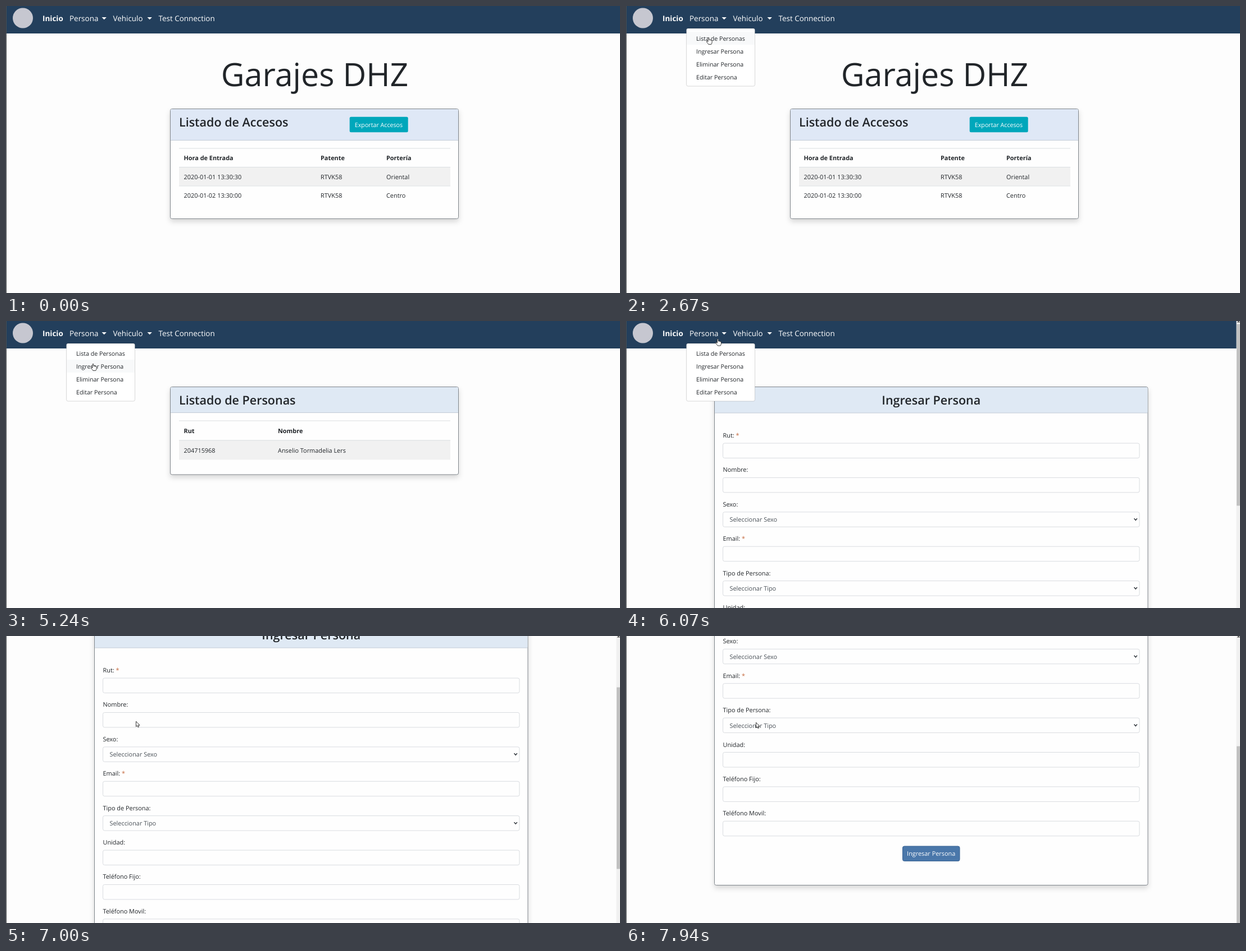
An HTML page for the animation above (8 s loop, 1093 by 512 pixels).

```html
<!DOCTYPE html>
<html lang="es">
<head>
<meta charset="utf-8">
<title>Accesos</title>
<style>
  html, body { margin: 0; width: 100%; height: 100%; overflow: hidden; background: #fdfdfd; }
  svg { display: block; width: 100vw; height: 100vh; }
  text { font-family: "Open Sans", "Noto Sans", sans-serif; text-rendering: geometricPrecision; }
  .card { fill: #fefefe; stroke: #80868c; filter: drop-shadow(0 5.8px 5px rgba(0, 0, 0, .15)); }
  .field { fill: #fefefe; stroke: #d9dce0; }
</style>
</head>
<body>
<svg id="stage" viewBox="0 0 1093 512"></svg>
<script>
const LOOP = 8000;
const LIST_LOAD = 3520, FORM_LOAD = 5750;
const INK = '#212529';
const NAV_HEIGHT = 49, MENU_TOP = 46, ITEM_HEIGHT = 23;
const menuItems = ['Lista de Personas', 'Ingresar Persona', 'Eliminar Persona', 'Editar Persona'];

const text = (x, y, content, { size = 10.9, weight = 400, fill = INK, anchor = 'start' } = {}) =>
  `<text x="${x}" y="${y}" font-size="${size}" font-weight="${weight}" fill="${fill}" text-anchor="${anchor}">${content}</text>`;
const rect = (x, y, w, h, fill, extra = '') =>
  `<rect x="${x}" y="${y}" width="${w}" height="${h}" fill="${fill}" ${extra}/>`;

function card({ x, y, w, h, header, tint = '#dfe9f4', title, centered }) {
  const style = { size: 21.5, weight: 600, anchor: centered ? 'middle' : 'start' };
  return `<rect class="card" x="${x}" y="${y}" width="${w}" height="${h}" rx="3"/>` +
    rect(x + .5, y + .5, w - 1, header, tint, 'rx="2.5"') +
    rect(x + .5, y + header, w - 1, 1, '#c3ccd7') +
    text(centered ? x + w / 2 : x + 15.5, y + 31.8, title, style);
}

function table(top, rowHeight, columns, rows) {
  return rows.map((cells, i) => {
    const y = top + i * rowHeight;
    const weight = i ? 400 : 700;
    return (i % 2 ? rect(308, y, 483, rowHeight, '#f1f1f1') : '') +
      rect(308, y, 483, 1, '#dbdfe2') +
      cells.map((cell, c) => text(columns[c], y + rowHeight / 2 + 5.1, cell, { weight })).join('');
  }).join('');
}

function homePage() {
  return text(549.5, 143, 'Garajes DHZ', { size: 57.3, anchor: 'middle' }) +
    card({ x: 292.5, y: 183.5, w: 513, h: 196, header: 55.5, tint: '#dfe8f6', title: 'Listado de Accesos' }) +
    rect(611.7, 197.7, 104, 27.6, '#00a7bb', 'rx="2.5"') +
    text(663.5, 216, 'Exportar Accesos', { size: 10.7, fill: '#fff', anchor: 'middle' }) +
    table(253.5, 33.5, [316.5, 560, 677], [
      ['Hora de Entrada', 'Patente', 'Portería'],
      ['2020-01-01 13:30:30', 'RTVK58', 'Oriental'],
      ['2020-01-02 13:30:00', 'RTVK58', 'Centro']
    ]);
}

function listPage() {
  return card({ x: 292.5, y: 117.5, w: 513, h: 156.5, header: 45.5, title: 'Listado de Personas' }) +
    table(177.5, 35, [316.5, 484], [['Rut', 'Nombre'], ['204715968', 'Anselio Tormadelia Lers']]);
}

function formPage() {
  const fields = [
    { label: 'Rut:', required: true }, { label: 'Nombre:' },
    { label: 'Sexo:', option: 'Seleccionar Sexo' }, { label: 'Email:', required: true },
    { label: 'Tipo de Persona:', option: 'Seleccionar Tipo' },
    { label: 'Unidad:' }, { label: 'Teléfono Fijo:' }, { label: 'Teléfono Movil:' }
  ];
  const rows = fields.map(({ label, required, option }, i) => {
    const y = 218 + i * 61.4;
    const star = required ? ' <tspan fill="#c4683c">*</tspan>' : '';
    return text(172.5, y - 10, label + star) +
      `<rect class="field" x="172.5" y="${y}" width="741.5" height="26.5" rx="3"/>` +
      (option ? text(184.5, y + 17.5, option, { fill: '#495057' }) +
        `<path d="M904.5 ${y + 11.5}l2.7 3 2.7-3" fill="none" stroke="#343a40" stroke-width="1.5"/>` : '');
  });
  return card({ x: 157.5, y: 117.5, w: 771.5, h: 644.5, header: 46, title: 'Ingresar Persona', centered: true }) +
    rows.join('') +
    rect(492.5, 692.5, 101.5, 26.5, '#4a77aa', 'rx="3" stroke="#386394"') +
    text(543.2, 709.8, 'Ingresar Persona', { fill: '#fff', anchor: 'middle' });
}

function navbar() {
  const link = { size: 13.45, fill: '#fff' };
  const caret = x => `<path d="M${x} 20h8.4l-4.2 4.3z" fill="#fff"/>`;
  return rect(0, 0, 1093, NAV_HEIGHT, '#233f5c') +
    '<circle id="logo" cx="30" cy="21.5" r="18" fill="#c6c7d0"/>' +
    text(65, 27, 'Inicio', { ...link, weight: 700 }) +
    text(113, 27, 'Persona', link) + caret(170.5) +
    text(190.5, 27, 'Vehiculo', link) + caret(251.5) +
    text(271.5, 27, 'Test Connection', link);
}

function dropdown() {
  return rect(107.5, 40, 122, 103, '#fff', 'rx="3" stroke="#000" stroke-opacity=".15"') +
    `<rect id="highlight" x="108" width="121" height="${ITEM_HEIGHT}"/>` +
    menuItems.map((item, i) =>
      `<g class="item">${text(125, 61.8 + i * ITEM_HEIGHT, item, { size: 10.65, fill: 'inherit' })}</g>`).join('');
}

const stage = document.getElementById('stage');
stage.innerHTML = rect(0, 0, 1093, 512, '#fdfdfd') +
  `<g id="page">
    <g id="home">${homePage()}</g><g id="list">${listPage()}</g><g id="form">${formPage()}</g>
    ${navbar()}<g id="menu">${dropdown()}</g>
  </g>
  <g id="scrollbar">${rect(1086.5, 0, 6.5, 512, '#f1f1f1')}
    <path d="M1087.5 2.5l3-3 3 3z" fill="#505050"/>
    <rect id="thumb" x="1087" width="6" height="324" fill="#c1c1c1"/>
  </g>
  ${rect(0, 0, 1, 512, '#4a4d50')}
  <g id="cursor" stroke="#222" stroke-width=".9" stroke-linejoin="round" fill="#fff">
    <path id="arrow" d="M.5 .3v9.4l2.1-1.9 1.5 3 1.5-.7-1.4-2.9h2.9z"/>
    <path id="hand" d="M-1 7.6V1.2Q0-.7 1 1.2V4.4Q2.2 3.6 3 4.8 4.2 4 4.9 5.3 6 5 6.1 6.3V8.7Q5.8 11 4.8 12.4H-.2Q-1.2 10.8-3.2 8.4-4.4 6.7-2.8 6.6-1.9 6.8-1 7.6z"/>
  </g>`;
const el = Object.fromEntries([...stage.querySelectorAll('[id]')].map(node => [node.id, node]));
const itemNodes = stage.querySelectorAll('.item');

// The pointer rests between these moves.
const entry = { x: 978, y: 436 };
const moves = [
  { from: 610, to: 1400, x: 126, y: 66 },
  { from: 1480, to: 1870, x: 126, y: 23 },
  { from: 2030, to: 2350, x: 147, y: 56 },
  { from: 4210, to: 4530, x: 151, y: 14 },
  { from: 4680, to: 4920, x: 153, y: 97 },
  { from: 5090, to: 5240, x: 155, y: 76 },
  { from: 5910, to: 6140, x: 165, y: 23 },
  { from: 6300, to: 6460, x: 231, y: 152 },
  { from: 7790, to: 7940, x: 231, y: 154 }
];

const during = (t, ...spans) => spans.some(([from, to]) => t >= from && t < to);
const show = (node, visible) => node.setAttribute('display', visible ? 'inline' : 'none');
const easeOut = (t, from, to, power) =>
  1 - (1 - Math.min(1, Math.max(0, (t - from) / (to - from)))) ** power;

function pointerAt(t) {
  return moves.reduce((p, { from, to, x, y }) => {
    const k = easeOut(t, from, to, 1.5);
    return { x: p.x + (x - p.x) * k, y: p.y + (y - p.y) * k };
  }, entry);
}

function render(t) {
  const { x, y } = pointerAt(t);
  const scroll = 317.5 * easeOut(t, 6732, 7630, 1.68);

  show(el.home, t < LIST_LOAD);
  show(el.list, during(t, [LIST_LOAD, FORM_LOAD]));
  show(el.form, t >= FORM_LOAD);
  show(el.scrollbar, t >= FORM_LOAD);
  show(el.logo, !during(t, [LIST_LOAD, 3750], [FORM_LOAD, 5840]));
  el.page.setAttribute('transform', `translate(0 ${-scroll})`);
  el.thumb.setAttribute('y', 5.5 + scroll * .602);

  const menuOpen = during(t, [1560, LIST_LOAD], [4290, FORM_LOAD], [5990, 6300]);
  const hovered = Math.floor((y - MENU_TOP) / ITEM_HEIGHT);
  const pressed = during(t, [2500, 2670], [5390, 5530]);
  show(el.menu, menuOpen);
  show(el.highlight, hovered >= 0 && hovered < menuItems.length);
  el.highlight.setAttribute('y', MENU_TOP + hovered * ITEM_HEIGHT);
  el.highlight.setAttribute('fill', pressed ? '#007bff' : '#f8f9fa');
  itemNodes.forEach((node, i) => node.setAttribute('fill', pressed && i === hovered ? '#fff' : INK));

  // After a click the hand stays until the pointer moves again.
  const hand = menuOpen || during(t, [LIST_LOAD, 4210], [FORM_LOAD, 5990]);
  show(el.cursor, t >= moves[0].from);
  show(el.hand, hand);
  show(el.arrow, !hand);
  el.cursor.setAttribute('transform', `translate(${x} ${y})`);
}

const start = performance.now();
function tick() {
  render((performance.now() - start) % LOOP);
  requestAnimationFrame(tick);
}
tick();
</script>
</body>
</html>
```
